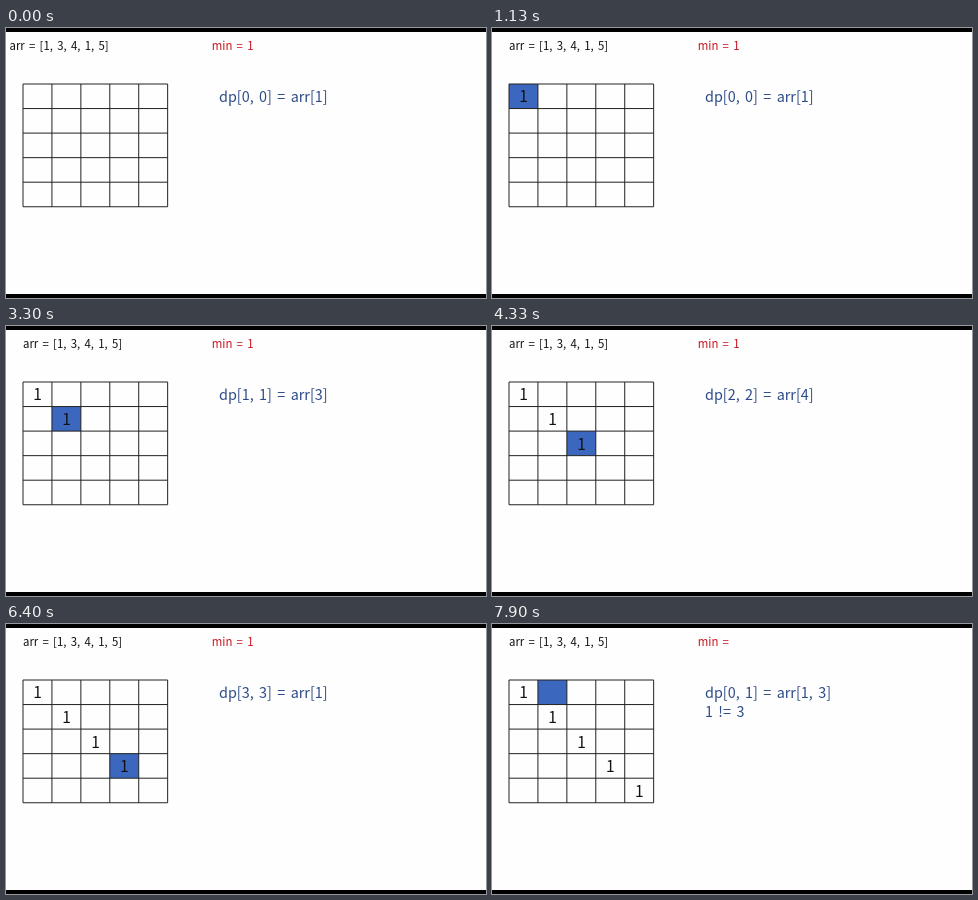
Write an HTML page with a canvas that moves like this. It is 480 by 270 pixels and loops after 8000 ms.

```html
<!DOCTYPE html>
<html lang="en">
<head>
<meta charset="utf-8">
<title>Table fill</title>
<style>
  html, body { margin: 0; width: 100%; height: 100%; overflow: hidden; background: #fff; }
  canvas { display: block; width: 480px; height: 270px; }
</style>
</head>
<body>
<canvas id="stage" width="480" height="270"></canvas>
<script>
const ctx = document.getElementById("stage").getContext("2d");
const LOOP = 8000;
const FONT = '"Noto Sans CJK SC", "Noto Sans CJK", "Noto Sans CJK JP", "Open Sans", sans-serif';
const INK = "#111", LINE = "#222", BLUE = "#3c67be", NAVY = "#2d4b87", RED = "#c8141e";
const SMALL = 11.4, LARGE = 14.4;
const BAR = 4;
const GRID = { x: 17, y: 56, w: 28.93, h: 24.55, n: 5 };

const arr = [1, 3, 4, 1, 5];
// When each diagonal cell is highlighted, and when its value appears.
const cellTimes = [400, 1850, 3350, 4850, 6430];
const valueTimes = [950, 2600, 4050, 5650, 6950];
const SHIFT = 950;   // the array label moves right
const PAIR = 7300;   // first two-element interval
const COMPARE = 7700;

const colX = i => GRID.x + GRID.w * i;
const rowY = i => GRID.y + GRID.h * i;
const countPast = (times, t) => times.filter(s => t >= s).length;

function text(str, x, y, size, color, align = "left") {
  ctx.font = `${size}px ${FONT}`;
  ctx.wordSpacing = `${size * 0.15}px`;
  ctx.textAlign = align;
  ctx.fillStyle = color;
  ctx.fillText(str, x, y);
}

function drawGrid() {
  const { n } = GRID;
  ctx.strokeStyle = LINE;
  ctx.lineWidth = 1;
  ctx.beginPath();
  for (let i = 0; i <= n; i++) {
    ctx.moveTo(colX(i), rowY(0));
    ctx.lineTo(colX(i), rowY(n));
    ctx.moveTo(colX(0), rowY(i));
    ctx.lineTo(colX(n), rowY(i));
  }
  ctx.stroke();
}

function fillCell(row, col) {
  ctx.fillStyle = BLUE;
  ctx.fillRect(colX(col), rowY(row), GRID.w, GRID.h);
}

function draw(t) {
  const pair = t >= PAIR;
  const active = countPast(cellTimes, t) - 1;
  const k = Math.max(active, 0);

  ctx.fillStyle = "#000";
  ctx.fillRect(0, 0, 480, 270);
  ctx.fillStyle = "#fefefe";
  ctx.fillRect(0, BAR, 480, 270 - 2 * BAR);

  text(`arr = [${arr.join(", ")}]`, t < SHIFT ? 3.5 : 17, 22, SMALL, INK);
  text(pair ? "min =" : "min = 1", 205.7, 22, SMALL, RED);

  if (pair) fillCell(0, 1);
  else if (active >= 0) fillCell(active, active);
  drawGrid();

  const filled = countPast(valueTimes, t);
  for (let i = 0; i < filled; i++) {
    text("1", colX(i) + 14.6, rowY(i) + 18.4, 15.5, INK, "center");
  }

  const formula = pair ? "dp[0, 1] = arr[1, 3]" : `dp[${k}, ${k}] = arr[${arr[k]}]`;
  text(formula, 213, 73.8, LARGE, NAVY);
  if (t >= COMPARE) text("1 != 3", 213, 92.8, LARGE, NAVY);
}

const start = performance.now();
function frame() {
  draw((performance.now() - start) % LOOP);
  requestAnimationFrame(frame);
}
frame();
</script>
</body>
</html>
```
